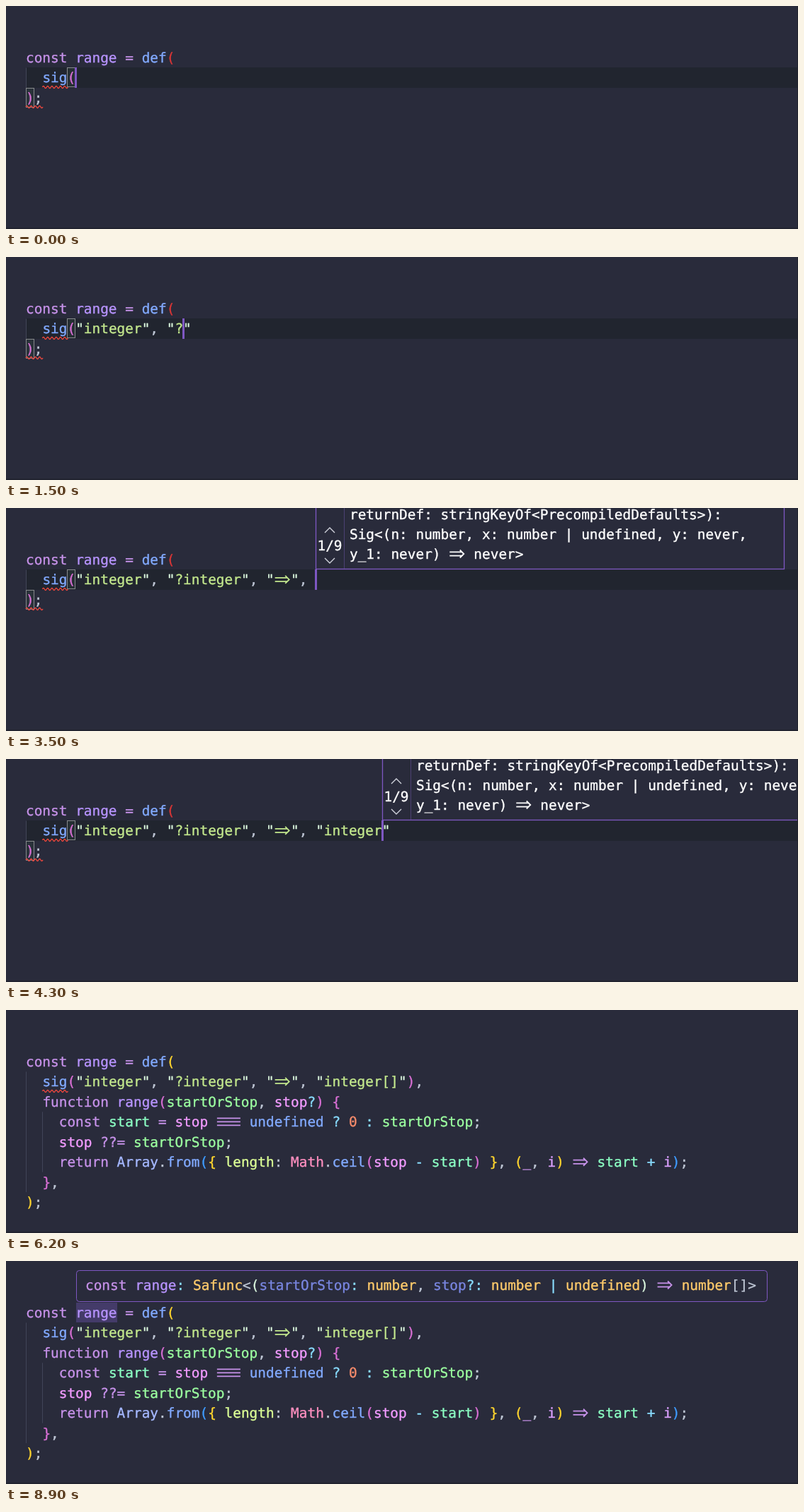
These frames come from a looping animation (1118 by 316 pixels, 10000 ms). An HTML page:

```html
<!DOCTYPE html>
<html lang="en">
<head>
<meta charset="utf-8">
<title>Typing a typed function</title>
<style>
html, body { margin: 0; width: 100%; height: 100%; overflow: hidden; background: #292b3b; }
svg { display: block; width: 1118px; height: 316px; font: 19.42px "DejaVu Sans Mono", monospace; }
text { white-space: pre; text-rendering: geometricPrecision; font-variant-ligatures: none; stroke-width: .35px; }
</style>
</head>
<body>
<svg id="stage" viewBox="0 0 1118 316"></svg>
<script>
const stage = document.getElementById("stage");
const LOOP = 10000, STEP = 100;
const CW = 11.69, LH = 28.45, LEFT = 28, TOP = 59;
const PURPLE = "#7e57c2", BG = "#292b3b";

const color = {
  k: "#c792ea", v: "#b894ff", f: "#82aaff", p: "#bfc7d5", s: "#c3e88d", q: "#d9f5dd",
  c: "#89ddff", n: "#f78c6c", t: "#ffcb6b", w: "#ffffff", a: "#7986e0",
  gold: "#ffd52e", orchid: "#da70d6", blue: "#3f9cff", red: "#d93636",
  from: "#9cffa0", stop: "#f29bff", start: "#8cffc4", len: "#dcff96",
  math: "#ff8fc0", arr: "#a5b8ff", i: "#dca0ff"
};

// Token lines alternate colour key and text
const BODY = [
  "k~function ~v~range~orchid~(~from~startOrStop~p~, ~stop~stop~c~?~orchid~) {",
  "k~  const ~start~start~k~ = ~stop~stop~k~ === ~f~undefined~c~ ? ~n~0~c~ : ~from~startOrStop~p~;",
  "stop~  stop~k~ ??= ~from~startOrStop~p~;",
  "k~  return ~arr~Array~p~.~f~from~blue~(~gold~{ ~len~length~p~: ~math~Math~p~.~f~ceil~orchid~(" +
    "~stop~stop~c~ - ~start~start~orchid~)~gold~ }~p~, ~gold~(~i~_~p~, ~i~i~gold~)~k~ => ~start~start~c~ + ~i~i~blue~)~p~;",
  "orchid~}~p~,"
];
const HOVER = "k~const ~v~range~c~: ~t~Safunc~p~<~q~(~a~startOrStop~c~: ~t~number~p~, ~a~stop~c~?: " +
  "~t~number~c~ | ~t~undefined~q~)~k~ => ~t~number~p~[]>";

const SIG = '"integer", "?integer", "=>", "integer[]"),';
// time, first and last typed length, one key per step
const RUNS = [
  [100, 1, 1], [300, 2, 8], [1100, 9, 9], [1200, 11, 11], [1400, 12, 13], [1700, 14, 20],
  [2500, 22, 24], [3000, 25, 29], [3600, 30, 37], [4500, 38, 41], [5100, 42, 42]
];

const HINTS = [
  { at: 2400, page: "1/9", lines: ['"=>", returnDef: stringKeyOf<PrecompiledDefaults>):',
    "Sig<(n: number, x: undefined, y: never, y_1: never)", "=> never>"] },
  { at: 3300, page: "1/9", lines: ["returnDef: stringKeyOf<PrecompiledDefaults>):",
    "Sig<(n: number, x: number | undefined, y: never,", "y_1: never) => never>"] },
  { at: 4800, page: "1/4", bold: "number[]>", lines: [", fn: (n: number, m?: number | undefined)",
    "=> number[]): Safunc<(n: number, m?: number |", "undefined) => number[]>"] }
];

const T = { enter: 5400, paste: 5700, blur: 6000, checked: 6600, hover: 8400 };

const colX = col => LEFT + col * CW;
const rowY = row => TOP + row * LH;
const base = row => rowY(row) + 21;
const esc = s => s.replace(/&/g, "&amp;").replace(/</g, "&lt;").replace(/>/g, "&gt;");
const rect = (x, y, w, h, fill, more = "") =>
  `<rect x="${x}" y="${y}" width="${w}" height="${h}" fill="${fill}" ${more}/>`;
const path = (d, stroke, width = 1) =>
  `<path d="${d}" fill="none" stroke="${stroke}" stroke-width="${width}"/>`;

// Text run with the wide arrow and triple-bar ligatures
function run(x, y, text, fill, weight = 400) {
  let out = "";
  for (const part of text.split(/(=>|===)/)) {
    const m = y - 7;
    if (part === "=>") {
      out += path(`M${x + 1} ${m - 2.6}H${x + 18.5}M${x + 1} ${m + 2.6}H${x + 18.5}` +
        `M${x + 15.5} ${m - 5.5}L${x + 21} ${m}L${x + 15.5} ${m + 5.5}`, fill, 1.8);
    } else if (part === "===") {
      out += path([-5, 0, 5].map(d => `M${x + 1} ${m + d}h33`).join(""), fill, 1.8);
    } else if (part.trim()) {
      const pad = part.length - part.trimStart().length;
      out += `<text x="${x + pad * CW}" y="${y}" fill="${fill}" stroke="${fill}" font-weight="${weight}">${esc(part.trim())}</text>`;
    }
    x += part.length * CW;
  }
  return out;
}

function tokens(x, y, line) {
  const parts = line.split("~");
  let out = "";
  for (let i = 0; i < parts.length; i += 2) {
    out += run(x, y, parts[i + 1], color[parts[i]]);
    x += parts[i + 1].length * CW;
  }
  return out;
}

const code = (row, col, line) => tokens(colX(col), base(row), line);

function squiggle(row, col, cells) {
  const x = colX(col), y = Math.round(rowY(row) + 26.5), end = x + cells * CW;
  let d = `M${x} ${y + 1}`;
  for (let px = x, up = true; px < end - 1; px += 3, up = !up) d += `q1.5 ${up ? -3 : 3} 3 0`;
  return path(d, "#f0483e", 1.3);
}

const bracketBox = (row, col) =>
  rect(Math.round(colX(col)) + .5, Math.round(rowY(row)) + .5, 11, 27, "#2c3a3a", 'fill-opacity=".5" stroke="#878a8c"');

const guide = (col, from, to) =>
  rect(Math.round(colX(col)), rowY(from), 1, (to - from) * LH, "#414558");

function typedLength(t) {
  let n = 0;
  for (const [at, first, last] of RUNS)
    if (t >= at) n = Math.min(last, first + Math.floor((t - at) / STEP));
  return n;
}

function signature(n) {
  let text = SIG.slice(0, n);
  if (n === 38) text += "]";
  if (text.split('"').length % 2 === 0) text += '"';
  let inside = false, out = "", col = 6;
  for (const part of text.match(/"|[^"]+/g) || []) {
    if (part === '"') {
      inside = !inside;
      out += run(colX(col), base(1), part, color.q);
    } else if (inside) {
      out += run(colX(col), base(1), part, color.s);
    } else {
      [...part].forEach((ch, i) => {
        out += run(colX(col + i), base(1), ch, ch === ")" ? color.orchid : color.p);
      });
    }
    col += part.length;
  }
  return out;
}

function hint(t, col) {
  const h = HINTS.filter(o => t >= o.at).pop();
  if (!h) return "";
  const x = Math.round(colX(col)), y = [15.5, 44, 72];
  let out = rect(x + .5, -20, 661, 106.5, BG, `stroke="${PURPLE}" stroke-width="1.3"`);
  out += rect(x + 40, 0, 1, 86, "#4c4173");
  out += path(`M${x + 13} 35l7-7l7 7M${x + 13} 71l7 7l7-7`, "#d0d3dc", 1.4);
  out += run(x + 20 - 1.5 * CW, 60, h.page, color.w);
  h.lines.forEach((line, i) => {
    let lx = x + 48;
    if (!i && h.bold) {
      out += run(lx, y[i], h.bold, color.w, 700);
      lx += h.bold.length * CW;
    }
    out += run(lx, y[i], line, color.w);
  });
  return out;
}

function hover(t) {
  const alpha = Math.min(1, (t - T.hover) / 200);
  return `<g opacity="${alpha}">` +
    rect(99.5, 13.5, 975, 44, BG, `rx="4" stroke="${PURPLE}"`) + tokens(112, 41, HOVER) + "</g>";
}

function draw(t) {
  const n = typedLength(t), closed = n >= 41;
  const entered = t >= T.enter, pasted = t >= T.paste, focus = t < T.blur;
  const endRow = pasted ? 7 : entered ? 3 : 2;
  const cursor = pasted ? [6, 4] : entered ? [2, 2] : [1, 6 + n];
  let out = rect(0, 0, 1118, 316, BG);

  if (focus) out += rect(LEFT, Math.round(rowY(cursor[0])), 1090, 29, "#21252f");
  out += guide(0, 1, endRow);
  if (pasted) out += guide(2, 3, 6);
  if (t >= T.hover) out += rect(99, 59, 58, 28, "#443b69");
  if (focus && !pasted) {
    out += closed ? bracketBox(0, 17) : bracketBox(1, 5);
    out += bracketBox(endRow, 0);
  }

  out += code(0, 0, `k~const ~v~range~k~ = ~f~def~${closed ? "gold" : "red"}~(`);
  out += code(1, 2, "f~sig~orchid~(") + signature(n);
  if (pasted) BODY.forEach((line, i) => { out += code(2 + i, 2, line); });
  out += code(endRow, 0, `${closed ? "gold" : "orchid"}~)~p~;`);

  if (t < T.checked) out += squiggle(1, 2, 3);
  if (!pasted) out += squiggle(endRow, 0, 2);
  if (!entered) out += hint(t, cursor[1]);
  if (focus) out += rect(Math.round(colX(cursor[1])) - 1, Math.round(rowY(cursor[0])), 3, 29, PURPLE);
  if (t >= T.hover) out += hover(t);

  out += rect(0, 314, 1118, 2, "#222430") + rect(1117, 0, 1, 316, "#1f212c");
  stage.innerHTML = out;
}

let shown = -1;
const origin = performance.now();
function tick() {
  const t = Math.floor(((performance.now() - origin) % LOOP) / STEP) * STEP;
  if (t !== shown) draw(shown = t);
  requestAnimationFrame(tick);
}
tick();
</script>
</body>
</html>
```
